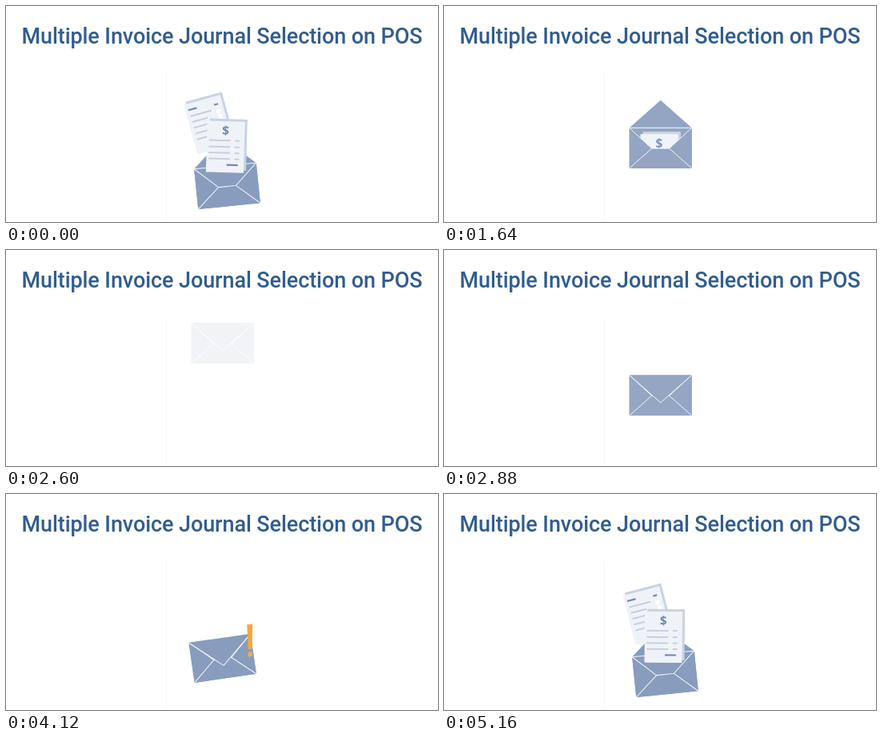
Write an HTML page that moves like this. It is 540 px wide and 270 px high and loops after 5200 ms.

```html
<!DOCTYPE html>
<html lang="en">
<head>
<meta charset="utf-8">
<title>Invoice journals</title>
<style>
  html, body { margin: 0; width: 100%; height: 100%; overflow: hidden; background: #fff; }
  svg { display: block; width: 100%; height: 100%; }
  .title { font: 500 27px Roboto, sans-serif; letter-spacing: -0.1px; fill: #315d90; }
  .dollar { font: 700 15.5px "Open Sans", sans-serif; text-anchor: middle; fill: #7189b4; }
  .blue { fill: #889cbd; }
  .seam { fill: none; stroke: #f1f4f9; stroke-width: 1; }
  .sheet { fill: #c8d2e2; }
  .page { fill: #eff3f8; }
  .row { fill: none; stroke: #c6d0df; stroke-width: 2; }
  .ink { fill: none; stroke: #7389b5; stroke-width: 2.2; }
</style>
</head>
<body>
<svg viewBox="0 0 540 270">
  <defs>
    <clipPath id="stage"><rect x="200" y="84" width="340" height="186"/></clipPath>
    <clipPath id="opening">
      <path id="mouth" d="M-200-300V-25.3H-39L-11 .5H11L39-25.3H200V-300Z"/>
    </clipPath>
  </defs>

  <text class="title" x="19.5" y="47">Multiple Invoice Journal Selection on POS</text>
  <path d="M200.5 84V270" stroke="#f7f7f8"/>

  <g clip-path="url(#stage)">
    <g id="scene">
      <g id="envelopeBack">
        <rect class="blue" x="-39" y="-25.3" width="78" height="50.6"/>
        <path class="blue" id="flapBack"/>
        <path class="seam" d="M-39-25.3H39"/>
      </g>

      <g id="papers" clip-path="url(#opening)">
        <g id="backPaper">
          <rect class="sheet" x="-20.5" y="-35" width="47" height="64"/>
          <rect class="page" x="-23.5" y="-32" width="47" height="64"/>
          <path class="ink" d="M-20-24h11M13-22h5"/>
          <path class="row" d="M-19-16H8M-19-8.5H1M-19-1H4M-19 6.5H0M-19 14H-4"/>
          <circle cx="16.5" cy="-13" r="3" fill="#fff"/>
          <circle cx="17" cy="-6" r="3" fill="#fff"/>
        </g>
        <g id="frontPaper">
          <rect class="sheet" x="-20.5" y="-35" width="47" height="64"/>
          <rect class="page" x="-23.5" y="-32" width="47" height="64"/>
          <text class="dollar" x="-0.3" y="-15">$</text>
          <path class="row" d="M-21-8H6M-21 0H6M-21 7.5H6M-21 15H6M11.5-8h6M11.5 0h6M11.5 7.5h6M11.5 15h6"/>
          <path class="ink" d="M2 22.5H16"/>
        </g>
      </g>

      <g id="envelopeFront">
        <path class="blue" d="M-39-25.3L-11 .5H11L39-25.3V25.3H-39Z"/>
        <path class="seam" d="M-39-25.3L-11 .5H11L39-25.3M-39 25.3L-11 .5M39 25.3L11 .5"/>
        <path class="blue" id="flapFront" stroke="#f1f4f9"/>
      </g>
    </g>

    <g id="bang" fill="#f5a742">
      <path d="M307 168H314L309 199H304Z"/>
      <path d="M303.3 202.3H308.7L307.8 208H302.3Z"/>
    </g>
  </g>
</svg>

<script>
  const LOOP = 5200, STEP = 40;
  const $ = id => document.getElementById(id);
  const lerp = (a, b, p) => a + (b - a) * p;
  const ramp = (t, from, to) => Math.min(1, Math.max(0, (t - from) / (to - from)));
  const easeInOut = p => p * p * (3 - 2 * p);

  const place = (id, x, y, angle) =>
    $(id).setAttribute('transform', `translate(${x} ${y}) rotate(${angle})`);

  const OPEN = { x: 276.5, y: 225, angle: -5.8 };

  // Tilted with papers out, upright, sent away upward, received, then opened again.
  function envelopeAt(t) {
    if (t < 1600) {
      const p = easeInOut(ramp(t, 1160, 1480));
      return { x: lerp(OPEN.x, 270.7, p), y: lerp(OPEN.y, 181.3, p),
               angle: lerp(OPEN.angle, 0, p), flap: 1, opacity: 1 };
    }
    if (t < 2560) {
      const p = ramp(t, 1600, 2000);
      return { x: 270.7, y: 181.3 - 37 * p, angle: 0, flap: 1, opacity: 1 - p };
    }
    if (t < 4520) {
      const arrive = ramp(t, 2560, 2920);
      const wobble = ramp(t, 3920, 4160);
      return { x: 270.7, y: lerp(107, 191, arrive) + 14.3 * ramp(t, 3840, 3960),
               angle: 9.5 * Math.sin(wobble * 2 * Math.PI), flap: -1, opacity: arrive };
    }
    const p = easeInOut(ramp(t, 4840, 5080));
    return { x: lerp(270.7, OPEN.x, p), y: lerp(205.3, OPEN.y, p),
             angle: OPEN.angle * p, flap: lerp(-1, 1, ramp(t, 4520, 4840)), opacity: 1 };
  }

  function drawPapers(t, env) {
    const now = t < 1000 ? t + LOOP : t;
    const leaving = now >= 4840;
    const out = leaving ? 1 - (1 - ramp(now, 4840, 5240)) ** 1.75 : 1 - ramp(now, 1000, 1400);
    const turn = leaving ? ramp(now, 5140, 5220) : 1 - ramp(now, 1040, 1400);
    place('frontPaper', lerp(env.x - 1.5, 274.3, out), lerp(env.y + 14.5, 175, out), 2.3 * turn);
    place('backPaper', lerp(env.x - 1.5, 253, out), lerp(env.y + 16, 146.5, out), -15.5 * out);
    $('papers').style.display = env.flap < -0.9 ? 'none' : '';
  }

  function drawBang(t, env) {
    const fall = ramp(t, 3720, 3960);
    const opacity = fall * (1 - ramp(t, 4520, 4780));
    $('bang').setAttribute('opacity', opacity);
    $('bang').setAttribute('transform',
      `rotate(${opacity ? env.angle : 0} 270.7 205.3) translate(${-3 * (1 - fall)} ${-107 * (1 - fall)})`);
  }

  function draw(t) {
    const env = envelopeAt(t);
    for (const id of ['envelopeBack', 'envelopeFront', 'mouth']) place(id, env.x, env.y, env.angle);
    const flap = `M-39-25.3L0 ${-25.3 - 34.5 * env.flap}L39-25.3`;
    $('flapBack').setAttribute('d', env.flap > 0 ? flap : '');
    $('flapFront').setAttribute('d', env.flap < 0 ? flap : '');
    $('scene').setAttribute('opacity', env.opacity);
    drawPapers(t, env);
    drawBang(t, env);
  }

  const start = performance.now();
  function tick() {
    const t = (performance.now() - start) % LOOP;
    draw(Math.floor(t / STEP) * STEP);
    requestAnimationFrame(tick);
  }
  tick();
</script>
</body>
</html>
```
